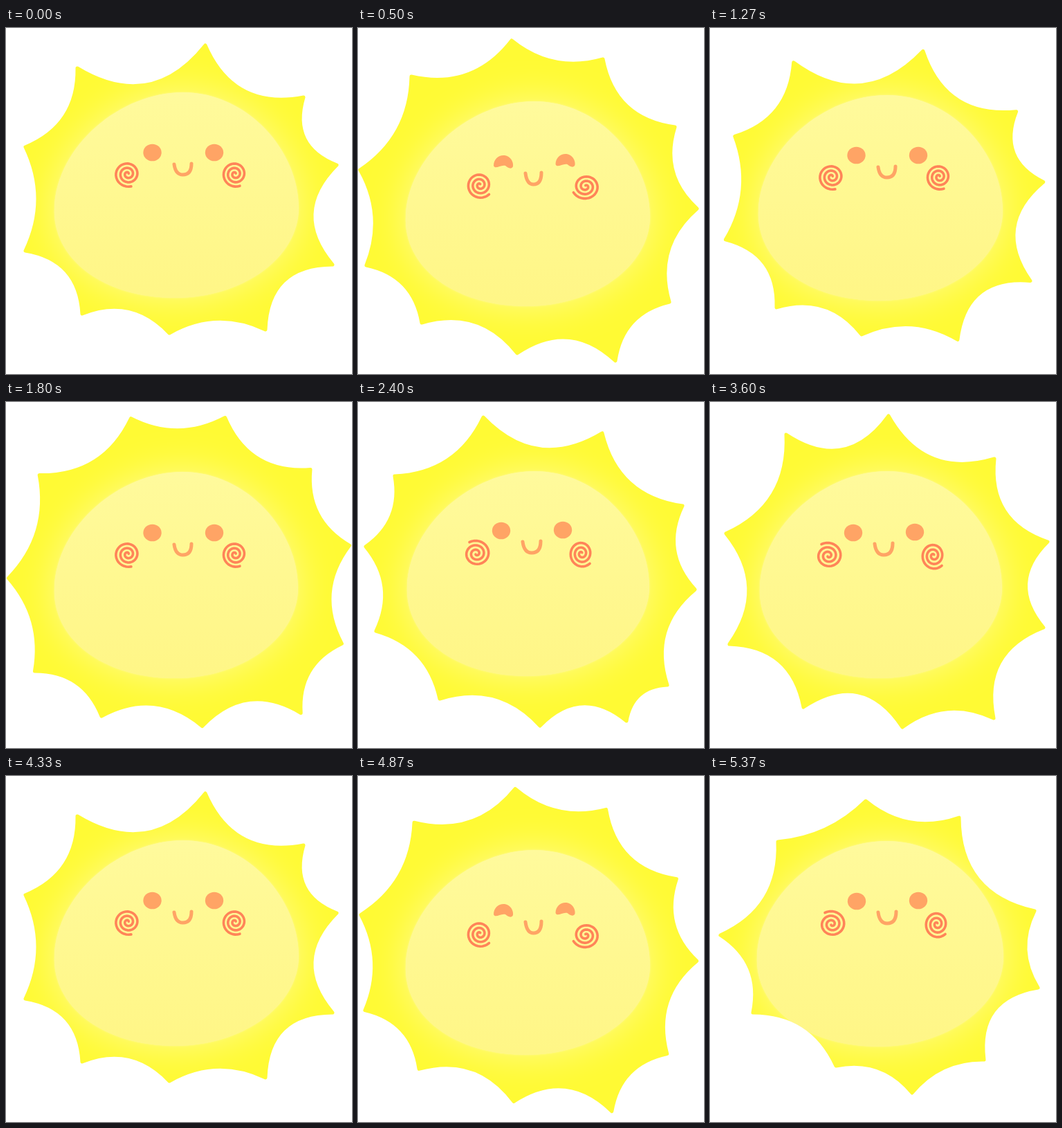
Animation, 500 px wide and 500 px high, one loop 5.41 s. Source, as an HTML page with a canvas:

```html
<!DOCTYPE html>
<html lang="en">
<head>
<meta charset="utf-8">
<title>Smiling sun</title>
<style>
  html, body { margin: 0; width: 100%; height: 100%; overflow: hidden; background: #fff; }
  canvas { display: block; }
</style>
</head>
<body>
<canvas id="stage" width="500" height="500"></canvas>
<script>
const ctx = document.getElementById('stage').getContext('2d');
const LOOP = 5410, CYCLE = 27, SPIN = 1.28 * Math.PI / 180;
const STEP_STARTS = [0, 70, 100, 130, 170];   // five drawings every 200 ms

// Ray tips: x, y, then the sag of the edge to the next tip in percent of its length
const wide = [[288,25,20], [430,100,23], [478,198,23], [472,342,24], [375,436,13],
  [236,441,17], [110,413,20], [28,322,12], [28,172,17], [103,58,22]];
const tilted = [[181,22,20], [353,45,17], [469,150,17], [487,271,17], [447,409,20], [388,461,23],
  [263,468,16], [118,429,15], [26,331,16], [11,209,16], [53,107,15]];
const deep = [[258,20,20], [411,82,20], [488,202,23], [482,326,21], [410,457,15],
  [278,470,25], [135,441,20], [28,350,19], [23,190,17], [110,47,24]];
const big = [[222,18,13], [354,45,18], [458,143,16], [490,261,16], [450,396,17], [372,481,20],
  [230,470,17], [92,426,17], [12,343,12], [3,205,13], [77,70,16]];
const small = [[225,36,14], [360,60,20], [469,195,14], [474,306,24], [396,410,12],
  [292,458,15], [182,419,16], [62,342,17], [15,230,17], [98,95,9]];

// from: first step shown, ref: step at which the tips hold, oval: left, top, right, bottom
const poses = [
  { from: 0, ref: 0, tips: wide, oval: [70, 93, 423, 390] },
  { from: 5, ref: 6, tips: tilted, oval: [71, 94, 421, 390] },
  { from: 8, ref: 9, tips: deep, oval: [72, 91, 422, 390] },
  { from: 11, ref: 12, tips: big, oval: [69, 94, 422, 390] },
  { from: 15, ref: 18, tips: big, oval: [70, 92, 422, 390], turn: -0.21, scale: 1.01, dx: 7 },
  { from: 21, ref: 22, tips: deep, oval: [71, 92, 423, 391], turn: 0.1, dx: 8, dy: -2 },
  { from: 25, ref: 26, tips: small, oval: [68, 93, 424, 390] }
];

// Spirals: x, y, rx, ry, start angle in degrees, direction, turns
const round = {
  eyes: [[211.5, 180], [301, 180]], mouth: [243, 197, 268, 212],
  spirals: [[176, 211, 19, 18.5, 75, 1, 2.7], [331, 211, 18.5, 18.5, 68, 1, 2.7]]
};
const curly = {
  eyes: [[207, 180], [296, 179]], mouth: [238, 196, 264, 212],
  spirals: [[171, 213, 20, 19, 240, 1, 2.7], [323, 213, 18, 19.5, 48, 1, 2.7]]
};
const blink = {
  eyes: [[210, 181], [299.5, 179]], closed: true, mouth: [242, 198, 265, 214],
  spirals: [[176, 215, 19, 19, 45, 1, 2.7], [329, 217, 20, 18.5, 152, -1, 2.7]]
};
const faces = [
  { from: 0, face: round }, { from: 5, face: curly }, { from: 10, face: blink },
  { from: 15, face: round }, { from: 20, face: curly, dx: 5 }
];

const pick = (list, step) => list.filter(item => item.from <= step).pop();
const bob = step => Math.min(step, CYCLE - step);

function drawRays(pose, step) {
  const { tips, ref, turn = 0, scale = 1, dx = 0, dy = 0 } = pose;
  const sourceStep = poses.find(p => p.tips === tips).ref;
  ctx.save();
  ctx.translate(250 + dx, 250 + dy + bob(step) - bob(sourceStep));
  ctx.rotate(turn + (step - ref) * SPIN);
  ctx.scale(scale, scale);
  ctx.translate(-250, -250);
  ctx.beginPath();
  ctx.moveTo(tips[0][0], tips[0][1]);
  tips.forEach(([x, y, sag], i) => {
    const [nx, ny] = tips[(i + 1) % tips.length];
    const k = sag / 50;
    ctx.quadraticCurveTo((x + nx) / 2 - (ny - y) * k, (y + ny) / 2 + (nx - x) * k, nx, ny);
  });
  ctx.closePath();
  ctx.fillStyle = ctx.strokeStyle = '#fffa34';
  ctx.lineWidth = 5;
  ctx.stroke();
  ctx.fill();
  ctx.clip();
  ctx.restore();
}

function drawOval([left, top, right, bottom]) {
  const w = right - left, h = bottom - top;
  const x = u => left + u * w, y = v => top + v * h;
  const fill = ctx.createLinearGradient(0, top, 0, bottom);
  fill.addColorStop(0, '#fffa9c');
  fill.addColorStop(1, '#fff686');
  ctx.beginPath();
  ctx.moveTo(x(0), y(.56));
  ctx.bezierCurveTo(x(.01), y(.26), x(.27), y(0), x(.525), y(0));
  ctx.bezierCurveTo(x(.795), y(0), x(1), y(.29), x(1), y(.56));
  ctx.bezierCurveTo(x(1), y(.81), x(.765), y(1), x(.495), y(1));
  ctx.bezierCurveTo(x(.2), y(1), x(-.01), y(.81), x(0), y(.56));
  ctx.fillStyle = fill;
  ctx.shadowColor = '#fffa8c';
  ctx.shadowBlur = 55;
  ctx.fill();
  ctx.shadowBlur = 3;
  ctx.fill();
  ctx.shadowBlur = 0;
}

function drawEye(x, y, closed) {
  ctx.beginPath();
  if (closed) {
    ctx.moveTo(x - 14, y + 6);
    ctx.bezierCurveTo(x - 14, y - 4, x - 6, y - 10, x + 2, y - 9);
    ctx.bezierCurveTo(x + 10, y - 8, x + 15, y, x + 14, y + 7);
    ctx.bezierCurveTo(x + 12, y + 12, x + 6, y + 9, x + 3, y + 6);
    ctx.bezierCurveTo(x - 3, y + 4, x - 12, y + 12, x - 14, y + 6);
  } else {
    ctx.ellipse(x, y, 13.2, 12.3, 0, 0, 7);
  }
  ctx.fill();
}

function drawSpiral([x, y, rx, ry, start, dir, turns]) {
  ctx.beginPath();
  for (let i = 0; i <= 90; i++) {
    const p = i / 90, r = 1 - .92 * p;
    const a = start * Math.PI / 180 + dir * p * turns * 2 * Math.PI;
    ctx.lineTo(x + rx * r * Math.cos(a), y + ry * r * Math.sin(a));
  }
  ctx.stroke();
}

function drawFace({ eyes, closed, mouth: [x1, y1, x2, y2], spirals }) {
  ctx.fillStyle = ctx.strokeStyle = '#ffa465';
  eyes.forEach(([x, y]) => drawEye(x, y, closed));
  const mid = (x1 + x2) / 2;
  ctx.lineWidth = 5;
  ctx.beginPath();
  ctx.moveTo(x1, y1);
  ctx.quadraticCurveTo(x1 + 2, y2, mid, y2);
  ctx.quadraticCurveTo(x2, y2, x2, y1 - 1);
  ctx.stroke();
  ctx.strokeStyle = '#ff8458';
  ctx.lineWidth = 3.6;
  spirals.forEach(drawSpiral);
}

function draw(time) {
  const t = Math.min(time % LOOP, 5399);
  const within = STEP_STARTS.filter(s => s <= t % 200).length - 1;
  const step = (5 * Math.floor(t / 200) + within) % CYCLE;
  const pose = pick(poses, step), { face, dx = 0 } = pick(faces, step);

  ctx.clearRect(0, 0, 500, 500);
  ctx.lineCap = ctx.lineJoin = 'round';
  ctx.save();
  drawRays(pose, step);
  // Keep the glow on the sun itself
  ctx.globalCompositeOperation = 'source-atop';
  ctx.translate(0, bob(step));
  drawOval(pose.oval);
  ctx.translate(dx, 0);
  drawFace(face);
  ctx.restore();
}

const begin = performance.now();
function tick() {
  draw(performance.now() - begin);
  requestAnimationFrame(tick);
}
tick();
</script>
</body>
</html>
```
